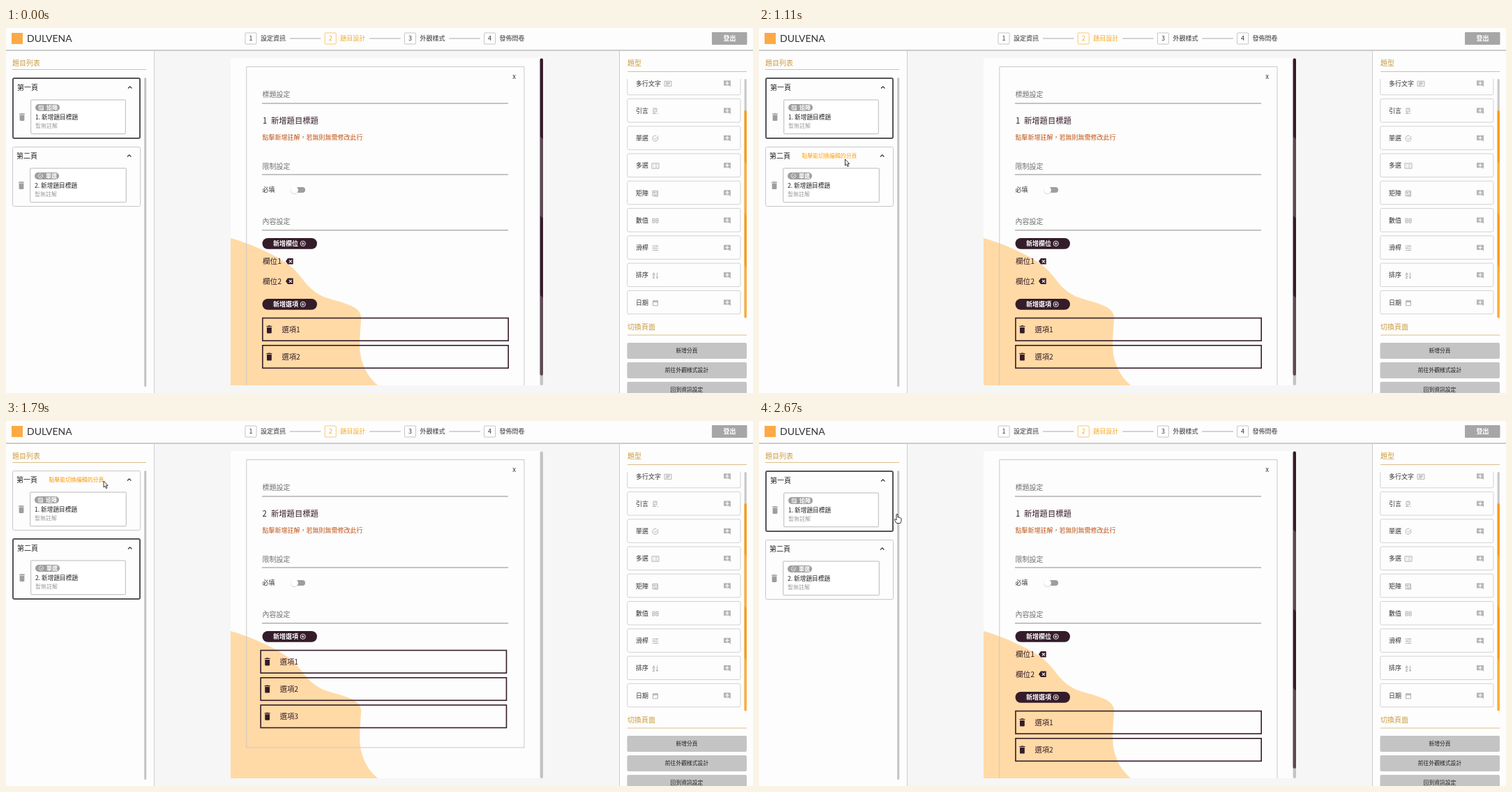
Write an HTML page that moves like this. It is 1071 by 523 pixels and loops after 2700 ms.

```html
<!DOCTYPE html>
<html lang="zh-Hant">
<head>
<meta charset="utf-8">
<style>
html, body { margin: 0; width: 100%; height: 100%; overflow: hidden; background: #f6f6f6; }
svg { display: block; width: 1071px; height: 523px; font-family: "Noto Sans CJK TC", "Noto Sans CJK", sans-serif; }
</style>
</head>
<body>
<svg id="stage" viewBox="0 0 1071 523" xmlns="http://www.w3.org/2000/svg">
  <defs>
    <clipPath id="sheetClip"><rect x="322" y="43" width="448" height="469"/></clipPath>
    <clipPath id="listClip"><rect x="885" y="73" width="172" height="342"/></clipPath>
  </defs>
  <g id="base"></g>
  <g id="first" clip-path="url(#sheetClip)"></g>
  <g id="second" clip-path="url(#sheetClip)"></g>
  <g id="pages"></g>
  <g id="pointer"></g>
</svg>
<script>
const LOOP = 2700;
const DARK = '#351c2a', PAPER = '#fdfdfd', GRAY = '#9e9e9e', GOLD = '#cb9c40', ORANGE = '#ff9800';
const $ = id => document.getElementById(id);

// ---- drawing helpers: y of a text is its vertical middle
const text = (x, y, size, str, fill = '#333', extra = '') =>
  `<text x="${x}" y="${y + size * .38}" font-size="${size}" fill="${fill}" ${extra}>${str}</text>`;
const box = (x, y, x2, y2, fill, stroke = 'none', w = 1, r = 0) =>
  `<rect x="${x}" y="${y}" width="${x2 - x}" height="${y2 - y}" rx="${r}" fill="${fill}" stroke="${stroke}" stroke-width="${w}"/>`;
const line = (x, y, x2, y2, stroke, w = 1) =>
  `<path d="M${x} ${y}L${x2} ${y2}" stroke="${stroke}" stroke-width="${w}"/>`;
const at = (x, y, body, scale = 1) => `<g transform="translate(${x} ${y}) scale(${scale})">${body}</g>`;
const BOLD = 'font-weight="700"', MIDDLE = 'text-anchor="middle"';

const ICONS = {
  lines: 'M-5-3.5H5V3.5H-5ZM-3-1.5H3M-3 0H3M-3 1.5H1',
  quote: 'M-3-4H2V1H-3ZM-1.5-2H1M-4 3.5H1M2.5 3.5H4M-2 1V3',
  check: 'M3.8-1A4 4 0 1 1 1.5-3.7M-2-.5L0 1.5L4.5-3.5',
  list: 'M-5-3.7H5V3.7H-5ZM-3-1.5H-1.8M-.5-1.5H3M-3 1.5H-1.8M-.5 1.5H3',
  grid: 'M-4-3.5H3.5V4H-4ZM-4-1.5H3.5M-1.5-1.5V4M.5 1H3.5V4H.5Z',
  digits: 'M-4-3H-1V3H-4ZM1-3H4V3H1ZM-4 0H-1M1 0H4',
  sliders: 'M-4.5-3H4.5M-4.5 0H4.5M-4.5 3H4.5M1.5-4V-2M-2-1V1M1 2V4',
  sort: 'M-4 0L-2.3-4L-.6 0M-3.4-1.4H-1.2M-4 1.3H-1L-4 4H-1M2.5-4V4M1 2.4L2.5 4L4 2.4',
  calendar: 'M-3.5-3H3.5V4H-3.5ZM-3.5-2H3.5M-3.5-1.2H3.5M-2-4V-3M2-4V-3'
};
const icon = (name, x, y, color, scale = 1) =>
  at(x, y, `<path d="${ICONS[name]}" fill="none" stroke="${color}" stroke-width=".9"/>`, scale);
const trash = (x, y, color) =>
  at(x, y, `<path d="M-4-5H-2L-1.3-5.6H1.3L2-5H4V-3.8H-4ZM-3.4-3H3.4V4.3Q3.4 5.5 2.2 5.5H-2.2Q-3.4 5.5-3.4 4.3Z" fill="${color}"/>`);

// scrollbar thumb with four alternating bands
function thumb(x, w, top, bottom, color) {
  const h = (bottom - top) / 4;
  let s = box(x, top, x + w, bottom, color, 'none', 0, w / 2);
  for (const i of [1, 3]) {
    const y = top + i * h, end = i === 3 ? bottom : y + h + 2;
    s += `<path d="M${x} ${y - 2}L${x + w} ${y + 2}V${end}L${x} ${i === 3 ? end : end - 4}Z" fill="#fff" opacity=".2"/>`;
  }
  return s;
}

function drawHeader() {
  let s = box(0, 0, 1071, 32, PAPER) + line(0, 32, 1071, 32, '#bcbcbc', 1.5);
  s += box(8, 7, 24, 23, '#fda946');
  s += text(30, 15, 14, 'DULVENA', '#333', 'font-family="Lato, sans-serif"');
  ['設定資訊', '題目設計', '外觀樣式', '發佈問卷'].forEach((label, i) => {
    const x = 343 + i * 114.2, on = i === 1;
    s += box(x, 7, x + 16, 23, '#fff', on ? '#f7c77a' : '#c4c4c4', 1, 1);
    s += text(x + 8, 15, 9, i + 1, on ? '#f9a825' : '#333', MIDDLE);
    s += text(x + 22, 15, 9, label, on ? '#f9a825' : '#333');
    if (i < 3) s += line(x + 64, 15, x + 108.5, 15, '#aaa');
  });
  return s + box(1012, 6, 1062.5, 24, '#a6a6a6', 'none', 0, 1) + text(1037.5, 15, 9, '登出', '#fff', MIDDLE + BOLD);
}

function drawTypes() {
  let s = box(879.5, 33, 1071, 523, PAPER) + line(879.5, 33, 879.5, 523, '#ccc');
  s += text(891, 50, 10, '題型', GOLD) + line(891, 62.5, 1062, 62.5, '#dcc08a', 1.2);
  s += '<g clip-path="url(#listClip)">';
  const types = [['多行文字', 'lines'], ['引言', 'quote'], ['單選', 'check'], ['多選', 'list'], ['矩陣', 'grid'],
    ['數值', 'digits'], ['滑桿', 'sliders'], ['排序', 'sort'], ['日期', 'calendar']];
  types.forEach(([label, name], i) => {
    const y = 62.3 + i * 39.25, c = y + 17;
    s += box(890.8, y, 1053, y + 33.5, PAPER, '#d2d2d2', 1, 2) + text(903, c, 9, label);
    s += icon(name, i ? 931 : 949, c + .5, '#aaa');
    s += at(1034, c, '<path d="M-5-4H5V5L3 3.3H-5Z" fill="#b5b5b5"/><path d="M-2.7-.3H2.7M0-3V2.4" stroke="#fff" stroke-width="1.2"/>');
  });
  s += '</g>' + box(1058.6, 73, 1061.8, 415, '#c8c8c8', 'none', 0, 1.5) + thumb(1058.6, 3.2, 118, 415.5, ORANGE);
  s += text(891, 428, 10, '切換頁面', GOLD) + line(891, 440, 1062, 440, '#dcc08a', 1.2);
  ['新增分頁', '前往外觀樣式設計', '回到資訊設定'].forEach((label, i) => {
    const y = 451 + i * 28;
    s += box(890.5, y, 1062, y + 23, '#c4c4c4', 'none', 0, 2) + text(976, y + 11.5, 7.8, label, '#222', MIDDLE + ' font-weight="500"');
  });
  return s;
}

function drawSheet() {
  let s = box(322, 43, 770, 512, PAPER, 'none', 0, 3);
  s += '<path d="M322 301C350 309 385 324 405 339C428 357 428 372 455 385C480 394 512 397 509 418C508 440 504 462 512 482C516 494 524 504 533 512H322Z" fill="#ffdaa6"/>';
  s += box(765.6, 43.5, 770, 512, '#c4c4c4', 'none', 0, 2);
  s += text(728.5, 69.5, 9.5, 'x', '#333', MIDDLE);
  [['標題設定', 95.5, 108], ['限制設定', 198, 210], ['內容設定', 277.5, 289.8]].forEach(([label, y, rule]) => {
    s += text(367.5, y, 10, label, '#6f6f6f') + line(367, rule, 720, rule, '#8a8a8a');
  });
  s += text(380, 132.5, 11.3, '新增題目標題', DARK);
  s += text(367.5, 157, 9, '點擊新增註解，若無則無需修改此行', '#bf5417');
  s += text(367.5, 232, 9, '必填');
  s += box(412, 228, 429, 236, GRAY, 'none', 0, 4);
  return s + '<circle cx="413.5" cy="232.6" r="5.4" fill="#ccc"/><circle cx="413.5" cy="232" r="5.2" fill="#fff"/>';
}

function pill(y, label) {
  return box(367.5, y, 446, y + 15.7, DARK, 'none', 0, 7.85) + text(383, y + 7.8, 9, label, '#fff', BOLD) +
    at(425.7, y + 7.9, '<path d="M-3.6 0A3.6 3.6 0 1 1 3.6 0A3.6 3.6 0 1 1-3.6 0M-2 0H2M0-2V2" fill="none" stroke="#fff" stroke-width=".9"/>');
}
const option = (x, y, n) => box(x, y, x + 352.3, y + 32.5, 'none', DARK, 1.6) +
  trash(x + 9.5, y + 16.3, DARK) + text(x + 27.5, y + 16.5, 10.3, '選項' + n, DARK);
const column = (y, n) => text(368, y, 10.6, '欄位' + n, DARK) +
  at(406.5, y + .3, `<path d="M-5.5 0L-2.5-4.2H5.2V4.2H-2.5Z" fill="${DARK}"/><path d="M-.6-2L3.4 2M3.4-2L-.6 2" stroke="#fff" stroke-width="1.1"/>`);

$('base').innerHTML = box(0, 0, 1071, 523, '#f6f6f6') + box(0, 33, 212.5, 523, PAPER) + line(212.5, 33, 212.5, 523, '#ccc') +
  text(9, 50, 10, '題目列表', GOLD) + line(9, 59.5, 201, 59.5, '#dcc08a', 1.2) +
  box(198.2, 71, 201.2, 514, '#c4c4c4', 'none', 0, 1.5) + drawTypes() + drawSheet() + drawHeader();
$('first').innerHTML = `<path d="M344.8 520V55.5H743V520" fill="none" stroke="#c9c9c9"/>` + thumb(765.6, 4.4, 43.5, 498, DARK) +
  text(368, 132.5, 11.3, '1', DARK) + pill(301, '新增欄位') + column(334, 1) + column(362.5, 2) +
  pill(388, '新增選項') + option(367.9, 415.6, 1) + option(367.9, 454.8, 2);
$('second').innerHTML = box(344.8, 55.5, 743, 468, 'none', '#c9c9c9') + text(367.5, 132.5, 11.3, '2', DARK) +
  pill(301, '新增選項') + [0, 1, 2].map(i => option(365.2, 328.6 + i * 39.2, i + 1)).join('');

// ---- motion
const clamp = v => Math.max(0, Math.min(1, v));
const mix = (a, b, p) => a + (b - a) * p;
const fade = (t, start, length) => 1 - (1 - clamp((t - start) / length)) ** 2;

// bursts of stepped motion: start, end, step
const BURSTS = [[330, 820, 70], [920, 1380, 65], [1460, 1930, 66], [2000, 2350, 70], [2540, 2670, 65]];
function stepped(t) {
  let held = 0;
  for (const [start, end, step] of BURSTS)
    if (t >= start) held = Math.min(end, start + Math.floor((t - start) / step) * step);
  return held;
}

// pointer tip: time, x, y
const PATH = [[330, 993, 511], [400, 700, 440], [470, 400, 345], [540, 225, 289], [610, 215, 270], [750, 150, 105],
  [820, 134, 68], [920, 134, 95], [1050, 123.5, 188], [1460, 123.5, 188], [1658, 140, 86], [2475, 140, 86], [2670, 198, 133]];
function tip(t) {
  const i = Math.max(1, PATH.findIndex(k => k[0] >= t));
  const [a, b] = [PATH[i - 1], PATH[i]], p = clamp((t - a[0]) / (b[0] - a[0]));
  return [mix(a[1], b[1], p), mix(a[2], b[2], p)];
}

function drawPage(top, active, hint, title, badge, name, n) {
  const b = 1 + active, h = 84 + 2 * b, x = 9 + b, y = top + b;
  const shade = Math.round(mix(200, 85, Math.sqrt(active)));
  let s = box(9 + b / 2, top + b / 2, 193 - b / 2, top + h - b / 2, PAPER, `rgb(${shade},${shade},${shade})`, b, 2);
  s += text(x + 5, y + 12, 10, title, '#222');
  if (hint > 0) s += text(61.5, y + 12, 7.9, '點擊能切換編輯的分頁', ORANGE, `opacity="${hint}" font-weight="500"`);
  s += `<path d="M${x + 164} ${y + 13.5}l2.7-2.7l2.7 2.7" fill="none" stroke="#333" stroke-width="1.2"/>`;
  s += trash(x + 12, y + 54.5, GRAY);
  s += box(x + 24.7, y + 30, 173.3 - b, y + 78.7, '#fff', '#b9b9b9', 1, 1);
  s += box(x + 31, y + 36, x + 66, y + 46, GRAY, 'none', 0, 5) + icon(name, x + 39.5, y + 41, '#fff', .8);
  s += text(x + 47, y + 41, 8, badge, '#fff', BOLD);
  s += text(x + 31, y + 54.3, 8.7, n + '.', '#222') + text(x + 40, y + 54.3, 8.7, '新增題目標題', '#222');
  return s + text(x + 31, y + 67, 8, '暫無註解', GRAY);
}

const ARROW = '<path d="M0 0V9L2 7.2L3.5 10.6L5 9.9L3.5 6.6H6.2Z" fill="#fff" stroke="#222" stroke-width=".9"/>';
const HAND = '<path d="M-1 1Q0-.6 1 1V5Q2.2 4.2 3 5.4Q4.2 4.8 4.7 6Q6 5.6 6 7V10Q5.6 12 4.7 13.5H-.7L-3.6 9Q-4.2 7.2-2.7 7.6L-1 9Z" fill="#fff" stroke="#222" stroke-width=".9"/>';

function render(t) {
  const toSecond = fade(t, 1150, 320), toFirst = fade(t, 2020, 300);
  const second = toSecond - toFirst;
  const showSecond = t >= 1180 && t < 2070;
  $('first').style.display = showSecond ? 'none' : '';
  $('second').style.display = showSecond ? '' : 'none';

  const hintSecond = fade(t, 960, 130) * (1 - toSecond);
  const hintFirst = fade(t, 1590, 180) * (1 - toFirst);
  const firstHeight = 84 + 2 * (2 - second);
  $('pages').innerHTML = drawPage(71, 1 - second, hintFirst, '第一頁', '矩陣', 'grid', 1) +
    drawPage(71 + firstHeight + 11, second, hintSecond, '第二頁', '單選', 'check', 2);

  if (t < 330) { $('pointer').innerHTML = ''; return; }
  const clicking = (t >= 1100 && t < 1180) || (t >= 2000 && t < 2070);
  const glow = clicking ? '<circle r="6.5" fill="#ffee3a" opacity=".7"/>' : '';
  $('pointer').innerHTML = at(...tip(t), glow + (t >= 2600 ? HAND : ARROW));
}

let shown = -1;
function tick(now) {
  const t = stepped(now % LOOP);
  if (t !== shown) render(shown = t);
  requestAnimationFrame(tick);
}
render(0);
requestAnimationFrame(tick);
</script>
</body>
</html>
```
